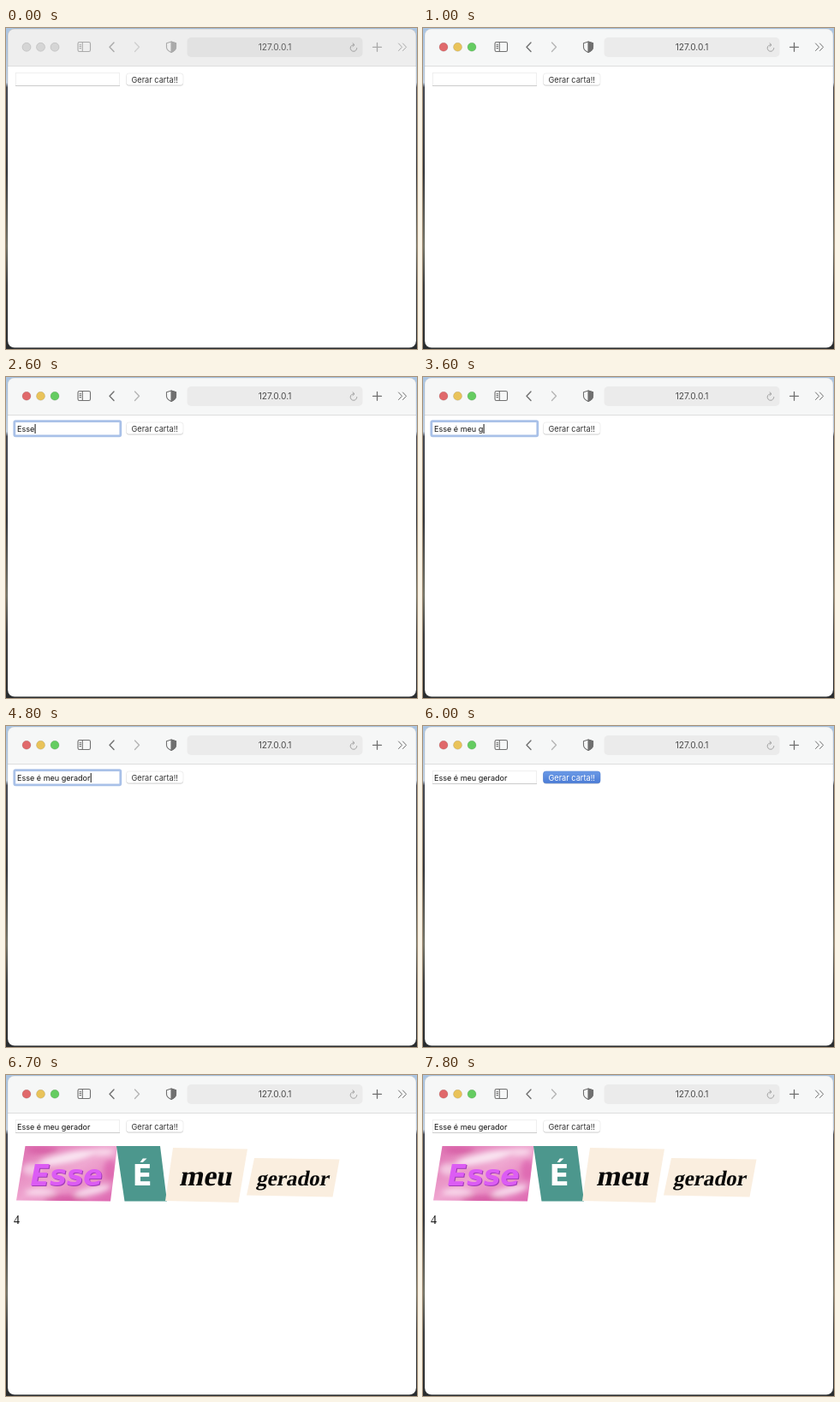
An HTML page for the animation above (7900 ms loop, 480x375 px).

```html
<!DOCTYPE html>
<html lang="pt">
<head>
<meta charset="utf-8">
<title>Gerador de carta</title>
<style>
  html, body { margin: 0; width: 100%; height: 100%; overflow: hidden; background: #fff; }
  svg { display: block; width: 480px; height: 375px; }
  .ui { font-family: Inter, "Liberation Sans", sans-serif; }
  .serif { font-family: "Liberation Serif", "Noto Serif", serif; }
  .wide { font-family: "DejaVu Sans", sans-serif; font-weight: bold; }
  .line { fill: none; stroke-linecap: round; stroke-linejoin: round; }
  #win { --bar: #f6f7f7; --url: #ebebeb; --icon: #707070; --dim: #b4b4b4;
         --red: #e0696b; --yellow: #e9c35a; --green: #65cc61; --rim: #0002; --text: #4b4b4b; }
  #win.idle { --bar: #eeeeee; --url: #e2e2e2; --icon: #aaaaaa; --dim: #cfcfcf;
         --red: #d5d5d5; --yellow: #d5d5d5; --green: #d5d5d5; --rim: #0003; --text: #5d5d5d; }
</style>
</head>
<body>
<svg viewBox="0 0 480 375">
  <defs>
    <linearGradient id="desk" x2="0" y2="1">
      <stop offset="0" stop-color="#a9c4e2"/>
      <stop offset=".17" stop-color="#c3d3e5"/>
      <stop offset=".185" stop-color="#474b55"/>
      <stop offset=".45" stop-color="#34373d"/>
      <stop offset=".68" stop-color="#77776a"/>
      <stop offset=".8" stop-color="#3b3d40"/>
      <stop offset="1" stop-color="#292c2e"/>
    </linearGradient>
    <linearGradient id="press" x2="0" y2="1">
      <stop offset="0" stop-color="#6b9ae6"/>
      <stop offset="1" stop-color="#4b7cd6"/>
    </linearGradient>
    <linearGradient id="pink" x2="1" y2="1">
      <stop offset="0" stop-color="#dc6cae"/>
      <stop offset=".5" stop-color="#efa6d0"/>
      <stop offset="1" stop-color="#dc62ae"/>
    </linearGradient>
    <clipPath id="pinkClip"><path d="M22.500 83H130L122 147.500L12 146.500Z"/></clipPath>
    <clipPath id="winClip"><rect x="2" y="1" width="477" height="372.500" rx="8"/></clipPath>
    <filter id="soft" x="-50%" y="-50%" width="200%" height="200%"><feGaussianBlur stdDeviation="3"/></filter>
  </defs>

  <rect width="480" height="375" fill="url(#desk)"/>

  <g id="win" class="idle">
    <g clip-path="url(#winClip)">
      <rect width="480" height="375" fill="#fff"/>
      <rect width="480" height="44" fill="var(--bar)"/>
      <rect y="44" width="480" height="1" fill="#dedede"/>
    </g>
    <rect x="2" y="1" width="477" height="372.500" rx="8" fill="none" stroke="var(--rim)" stroke-width=".7"/>

    <g stroke="#0002" stroke-width=".8">
      <circle cx="24" cy="22.300" r="5" fill="var(--red)"/>
      <circle cx="40.500" cy="22.300" r="5" fill="var(--yellow)"/>
      <circle cx="57" cy="22.300" r="5" fill="var(--green)"/>
    </g>

    <g class="line" stroke="var(--icon)" stroke-width="1.100">
      <rect x="84" y="16.500" width="14.500" height="11" rx="1.800"/>
      <path d="M89.300 16.500V27.500M86 19.200H87.500M86 21.400H87.500M86 23.600H87.500"/>
      <path d="M126 17L121 22.300L126 27.500" stroke-width="1.400"/>
      <path d="M150.500 17L155.500 22.300L150.500 27.500" stroke="var(--dim)" stroke-width="1.300"/>
      <path d="M193 16L198.500 17.800V22.500Q198.500 26 193 28.500Q187.500 26 187.500 22.500V17.800Z"/>
      <path d="M193 16L198.500 17.800V22.500Q198.500 26 193 28.500Z" fill="var(--icon)"/>
      <path d="M428.500 22.300H438.500M433.500 17.300V27.300" stroke-width="1.300"/>
      <path d="M458.500 18L462.500 22.300L458.500 26.500M463.500 18L467.500 22.300L463.500 26.500" stroke-width="1"/>
    </g>

    <rect x="211.500" y="11" width="205" height="23" rx="5" fill="var(--url)"/>
    <text class="ui" x="314" y="26.300" font-size="10.200" text-anchor="middle" fill="var(--text)">127.0.0.1</text>
    <g class="line" stroke="#999" stroke-width=".9">
      <path d="M406.500 19.700A3.800 3.800 0 1 0 409.800 23.500M405 17.800L407 19.700L405 21.600"/>
    </g>
  </g>

  <rect id="ring" x="9.800" y="51.600" width="124" height="17.200" rx="1.500" fill="#fff" stroke="#a9c1e8" stroke-width="2.800"/>
  <g id="box">
    <rect x="11.500" y="52.500" width="121" height="15" fill="#fff" stroke="#ececec" stroke-width=".8"/>
    <path d="M11 67.500H133" stroke="#c9c9c9" stroke-width=".9"/>
  </g>
  <text id="typed" class="ui" x="13" y="63.800" font-size="9.050" fill="#111" xml:space="preserve"></text>
  <rect id="caret" y="55" width="1" height="11" fill="#111"/>

  <rect x="140.500" y="54" width="66.500" height="13.500" rx="3" fill="#c4c4c4"/>
  <rect id="face" x="140.500" y="53" width="66.500" height="13.700" rx="3" fill="#fff" stroke="#e4e4e4" stroke-width=".6"/>
  <text id="label" class="ui" x="173.700" y="63.800" font-size="9.200" text-anchor="middle" fill="#333">Gerar carta!!</text>

  <g id="cards">
    <g clip-path="url(#pinkClip)">
      <rect x="10" y="82" width="122" height="67" fill="url(#pink)"/>
      <g filter="url(#soft)" fill="#fff">
        <ellipse cx="70" cy="97" rx="34" ry="6" opacity=".75" transform="rotate(-12 70 97)"/>
        <ellipse cx="112" cy="90" rx="15" ry="4" opacity=".6"/>
        <ellipse cx="30" cy="110" rx="11" ry="7" opacity=".5"/>
        <ellipse cx="101" cy="135" rx="22" ry="5" opacity=".7" transform="rotate(-14 101 135)"/>
        <ellipse cx="40" cy="137" rx="18" ry="4" opacity=".6"/>
        <ellipse cx="43" cy="88" rx="18" ry="4" fill="#cf4898" opacity=".6"/>
        <ellipse cx="70" cy="145" rx="26" ry="4" fill="#cf4598" opacity=".7"/>
        <ellipse cx="122" cy="111" rx="8" ry="12" fill="#d957a8" opacity=".6"/>
      </g>
    </g>
    <g class="wide" font-size="33" font-style="italic">
      <text x="29.500" y="130" fill="#a23bb8">Esse</text>
      <text x="28.500" y="129" fill="#dc5cf4">Esse</text>
    </g>
    <path d="M129 83H180L188 147.500H138.500Z" fill="#4c978d"/>
    <text class="wide" x="159" y="129" font-size="34" text-anchor="middle" fill="#fff">É</text>
    <g fill="#faeedf">
      <path d="M195 85L282 86.500L271.500 149L186 147Z"/>
      <path d="M290 97L389.500 98.500L381.500 142.500L281 140.500Z"/>
    </g>
    <g class="serif" font-weight="bold" fill="#080808">
      <text transform="translate(202 129) skewX(-11)" font-size="33.500">meu</text>
      <text transform="translate(292 129) skewX(-11)" font-size="25">gerador</text>
    </g>
    <text class="serif" x="9" y="174" font-size="14" fill="#111">4</text>
  </g>
</svg>
<script>
  const LOOP = 7900, ACTIVE = 1000, FOCUS = 1800, CLICK = 6000, DONE = 6100;
  const PHRASE = "Esse é meu gerador";
  // moment each character of the phrase is typed
  const KEYS = [2000, 2300, 2400, 2600, 2800, 2900, 3000, 3100, 3200,
                3400, 3500, 3600, 3800, 3900, 4100, 4200, 4300, 4600];
  const $ = id => document.getElementById(id);
  const show = (id, on) => $(id).style.display = on ? "" : "none";
  const pen = document.createElement("canvas").getContext("2d");
  pen.font = '9.05px Inter, "Liberation Sans", sans-serif';

  // solid for 500 ms after a key, then fades out and in by turns
  function caretAlpha(since) {
    const turn = Math.floor(since / 500);
    if (turn < 1) return 1;
    const k = Math.min(1, (Math.floor(since % 500 / 100) + 1) / 3);
    return turn % 2 ? 1 - k : k;
  }

  function draw(t) {
    const count = KEYS.filter(k => k <= t).length;
    const text = PHRASE.slice(0, count);
    const focused = t >= FOCUS && t < CLICK;
    const pressed = t >= CLICK && t < DONE;

    $("win").classList.toggle("idle", t < ACTIVE);
    show("ring", focused);
    show("box", !focused);
    show("caret", focused);
    show("cards", t >= DONE);

    $("typed").textContent = text;
    $("caret").setAttribute("x", 13.3 + pen.measureText(text).width);
    $("caret").setAttribute("opacity", caretAlpha(t - (count ? KEYS[count - 1] : FOCUS)));

    $("face").setAttribute("fill", pressed ? "url(#press)" : "#fff");
    $("face").setAttribute("stroke", pressed ? "#4b7cd6" : "#e4e4e4");
    $("label").setAttribute("fill", pressed ? "#fff" : "#333");
  }

  const start = performance.now();
  function tick() {
    draw((performance.now() - start) % LOOP);
    requestAnimationFrame(tick);
  }
  tick();
</script>
</body>
</html>
```
